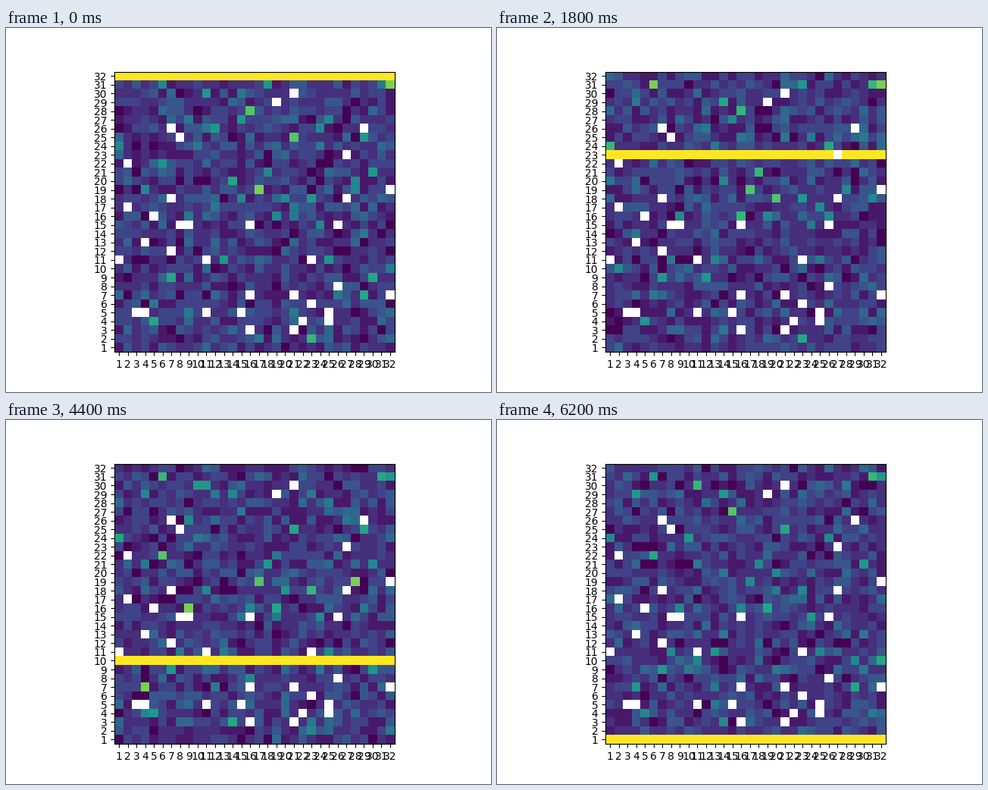
These frames come from a looping animation (640 px wide and 480 px high, 6.4 s). A matplotlib script:

```python
import numpy as np
import matplotlib.pyplot as plt
from matplotlib.animation import FuncAnimation

SIZE = 32
PEAK = 15
HOT_SHARE = 0.045

# Dead pixels, row -> columns (both counted from 1)
DEAD = {
    3: [16, 21], 4: [22, 25], 5: [3, 4, 11, 15, 25], 6: [23],
    7: [16, 21, 32], 8: [26], 11: [1, 11, 23], 12: [7], 13: [4],
    15: [8, 9, 16, 26], 16: [5], 17: [2], 18: [7, 27], 19: [32],
    22: [2], 23: [27], 25: [8], 26: [7, 29], 29: [19], 30: [21],
}


def pixel_rates():
    """Mean count of every pixel: an even background and a few hot pixels."""
    rng = np.random.default_rng(4)
    background = rng.gamma(20, 2.35 / 20, (SIZE, SIZE))
    hot = rng.uniform(4, 8.5, (SIZE, SIZE))
    return np.where(rng.random((SIZE, SIZE)) < HOT_SHARE, hot, background)


def dead_mask():
    mask = np.zeros((SIZE, SIZE), bool)
    for row, cols in DEAD.items():
        mask[row - 1, np.array(cols) - 1] = True
    return mask


RATES = pixel_rates()
MASK = dead_mask()


def counts(step):
    rng = np.random.default_rng(100 + step)
    noisy = rng.normal(RATES, 0.8 * np.sqrt(RATES))
    data = np.clip(np.rint(noisy), 0, PEAK - 1)
    data[SIZE - 1 - step] = PEAK  # scan line
    return np.ma.masked_array(data, MASK)


fig, ax = plt.subplots(figsize=(6.4, 4.8), dpi=100)
edges = (0.5, SIZE + 0.5)
image = ax.imshow(counts(0), origin="lower", extent=edges * 2, cmap="viridis",
                  vmin=0, vmax=PEAK, interpolation="nearest")
ticks = range(1, SIZE + 1)
ax.set_xticks(ticks)
ax.set_yticks(ticks)


def update(step):
    image.set_data(counts(step))
    return [image]


anim = FuncAnimation(fig, update, frames=SIZE, interval=200, repeat=True)
plt.show()
```
